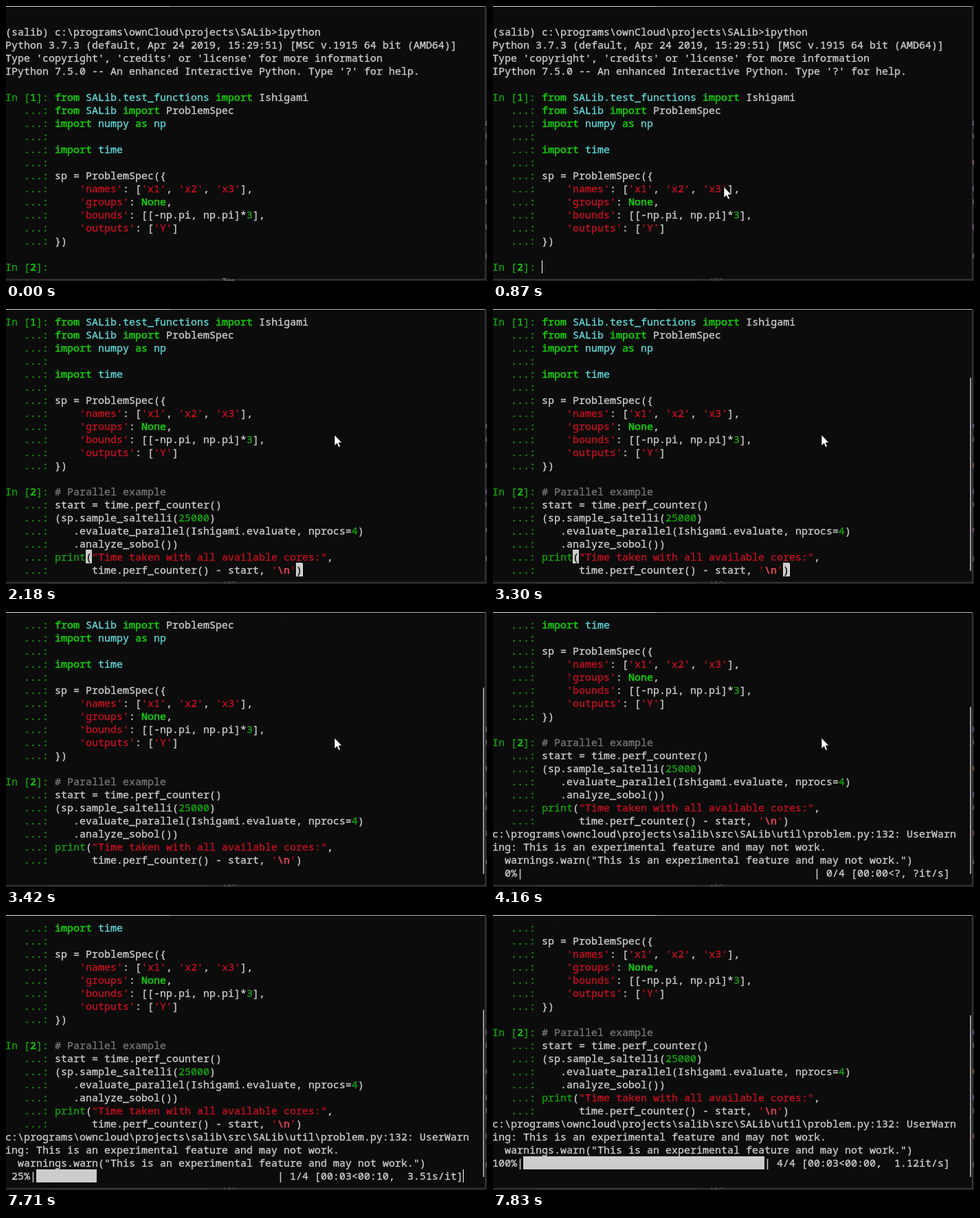
An HTML page that plays this animation: 700x400 px, repeating every 8000 ms.

```html
<!DOCTYPE html>
<html lang="en">
<head>
<meta charset="utf-8">
<title>Parallel run in IPython</title>
<style>
html, body { margin: 0; width: 100%; height: 100%; overflow: hidden; background: #0c0c0c; }
#stage { position: relative; width: 700px; height: 400px; overflow: hidden; background: #0c0c0c; }
#stage > * { position: absolute; }

/* every animated part shares one clock and changes without easing */
#log, #cursor, #mouse, #thumb, .pasted, .match, .output, .p0, .p25, .p100, .tab {
  animation: 8s step-end infinite;
}

#screen { left: -1px; top: 9px; width: 701px; height: 380px; overflow: hidden; }
#log {
  position: absolute; left: 0; top: 19px; margin: 0;
  font: 15px/19px "Noto Sans Mono", "DejaVu Sans Mono", monospace;
  font-variant-ligatures: none; color: #ccc; white-space: pre;
  -webkit-text-stroke: .35px;
  animation-name: scroll;
}
#log i { font-style: normal; color: #13a10e; }
#log b { color: #16c60c; font-weight: 400; -webkit-text-stroke: .6px; }
#log u { color: #61d6d6; text-decoration: none; }
#log s { color: #c50f1f; text-decoration: none; }
#log em { color: #767676; font-style: normal; }
#log strong { color: #e74856; font-weight: 400; -webkit-text-stroke: .6px; }
.pasted { animation-name: paste; }
.match { animation-name: match; }
.output { animation-name: output; }
.progress { position: absolute; left: 0; top: 532px; }
.p0 { animation-name: p0; }
.p25 { animation-name: p25; }
.p100 { animation-name: p100; }
.bar { display: inline-block; width: 351px; height: 19px; vertical-align: top; }
.bar::before { content: ""; display: block; height: 100%; width: var(--done); background: #ccc; }

#cursor { left: 0; top: 370px; width: 1px; height: 19px; background: #fff; animation-name: cursor; }
#thumb { left: 694px; top: 100px; width: 2px; height: 281px; background: #9a9a9a; animation-name: thumb; }
#mouse { left: 0; top: 0; animation-name: mouse; }
.tab { font: 10px/10px "Noto Sans", sans-serif; left: 315px; top: 395px; color: #999; }
.tab.before { animation-name: before; }
.tab.after { color: #4a4a4a; animation-name: after; }

@keyframes scroll {
  0% { transform: translateY(0); }
  13.25% { transform: translateY(-114px); }
  42% { transform: translateY(-133px); }
  52% { transform: translateY(-190px); }
  97.875%, 100% { transform: translateY(-209px); }
}
@keyframes thumb {
  0% { visibility: hidden; top: 100px; height: 281px; }
  41.25% { visibility: visible; top: 100px; height: 281px; }
  42% { visibility: visible; top: 110px; height: 271px; }
  52% { visibility: visible; top: 138px; height: 243px; }
  97.875%, 100% { visibility: visible; top: 146px; height: 235px; }
}
@keyframes paste { 0% { visibility: hidden; } 13.25%, 100% { visibility: visible; } }
@keyframes output { 0% { visibility: hidden; } 52%, 100% { visibility: visible; } }
@keyframes match {
  0% { background: #ccc; color: #0c0c0c; }
  42%, 100% { background: none; color: #ccc; }
}
@keyframes p0 { 0%, 95.5%, 100% { visibility: hidden; } 52% { visibility: visible; } }
@keyframes p25 { 0%, 97.125%, 100% { visibility: hidden; } 95.5% { visibility: visible; } }
@keyframes p100 { 0% { visibility: hidden; } 97.125%, 100% { visibility: visible; } }
@keyframes before { 0% { visibility: visible; } 7%, 100% { visibility: hidden; } }
@keyframes after { 0% { visibility: hidden; } 7%, 100% { visibility: visible; } }
@keyframes cursor {
  0% { left: 71px; opacity: 0; }
  7% { left: 71px; opacity: 1; }
  13.25%, 27.25%, 41.25% { left: 431px; opacity: 1; }
  20.25%, 34.25% { left: 431px; opacity: 0; }
  42%, 62.75%, 76.125%, 90.125% { left: 665px; opacity: 0; }
  56%, 69.25%, 83.125%, 94.625% { left: 665px; opacity: 1; }
  97.125%, 100% { left: 665px; opacity: 0; }
}
@keyframes mouse {
  0% { transform: translate(600px, 402px); }
  .625% { transform: translate(596px, 394px); }
  1.375% { transform: translate(579px, 384px); }
  2.125% { transform: translate(560px, 375px); }
  3% { transform: translate(543px, 368px); }
  3.75% { transform: translate(530px, 364px); }
  4.5% { transform: translate(523px, 362px); }
  7% { transform: translate(510px, 356px); }
  7.75% { transform: translate(486px, 344px); }
  8.625% { transform: translate(452px, 326px); }
  9.375% { transform: translate(412px, 304px); }
  10.125% { transform: translate(372px, 282px); }
  10.875% { transform: translate(336px, 263px); }
  11.75% { transform: translate(308px, 248px); }
  12.5% { transform: translate(291px, 239px); }
  13.25% { transform: translate(283px, 235px); }
  14% { transform: translate(284px, 235px); }
  14.75% { transform: translate(350px, 217px); }
  15.5% { transform: translate(420px, 200px); }
  16.25% { transform: translate(462px, 191px); }
  17.125% { transform: translate(478px, 183px); visibility: visible; }
  68.375%, 100% { transform: translate(478px, 183px); visibility: hidden; }
}
</style>
</head>
<body>
<div id="stage">
<div id="screen"><pre id="log">(salib) c:\programs\ownCloud\projects\SALib>ipython
Python 3.7.3 (default, Apr 24 2019, 15:29:51) [MSC v.1915 64 bit (AMD64)]
Type 'copyright', 'credits' or 'license' for more information
IPython 7.5.0 -- An enhanced Interactive Python. Type '?' for help.

<i>In [<b>1</b>]: </i><b>from</b> <u>SALib.test_functions</u> <b>import</b> Ishigami
<i>   ...: </i><b>from</b> <u>SALib</u> <b>import</b> ProblemSpec
<i>   ...: </i><b>import</b> <u>numpy</u> <b>as</b> <u>np</u>
<i>   ...: </i>
<i>   ...: </i><b>import</b> <u>time</u>
<i>   ...: </i>
<i>   ...: </i>sp = ProblemSpec({
<i>   ...: </i>    <s>'names'</s>: [<s>'x1'</s>, <s>'x2'</s>, <s>'x3'</s>],
<i>   ...: </i>    <s>'groups'</s>: <b>None</b>,
<i>   ...: </i>    <s>'bounds'</s>: [[-np.pi, np.pi]*<i>3</i>],
<i>   ...: </i>    <s>'outputs'</s>: [<s>'Y'</s>]
<i>   ...: </i>})

<i>In [<b>2</b>]: </i><span class="pasted"><em># Parallel example</em>
<i>   ...: </i>start = time.perf_counter()
<i>   ...: </i>(sp.sample_saltelli(<i>25000</i>)
<i>   ...: </i>   .evaluate_parallel(Ishigami.evaluate, nprocs=<i>4</i>)
<i>   ...: </i>   .analyze_sobol())
<i>   ...: print</i><span class="match">(</span><s>"Time taken with all available cores:"</s>,
<i>   ...: </i>      time.perf_counter() - start, <s>'<strong>\n</strong>'</s><span class="match">)</span></span>
<span class="output">c:\programs\owncloud\projects\salib\src\SALib\util\problem.py:132: UserWarn
ing: This is an experimental feature and may not work.
  warnings.warn("This is an experimental feature and may not work.")</span>
<span class="progress p0">  0%|<span class="bar" style="width:423px;--done:0"></span>| 0/4 [00:00&lt;?, ?it/s]</span><span class="progress p25"> 25%|<span class="bar" style="--done:25%"></span>| 1/4 [00:03&lt;00:10,  3.51s/it]</span><span class="progress p100">100%|<span class="bar" style="--done:100%"></span>| 4/4 [00:03&lt;00:00,  1.12it/s]</span></pre></div>
<div id="cursor"></div>
<div id="thumb"></div>

<!-- window border and the slivers of the editor behind it -->
<svg width="700" height="400" style="left:0;top:0">
  <path d="M0 .5H238" stroke="#e0e0e0"/>
  <path d="M238 .5H700" stroke="#b4b4b4"/>
  <path d="M0 397.5H698" stroke="#3a3a3a"/>
  <path d="M0 399H700" stroke="#222" stroke-width="2"/>
  <path d="M62 399H295" stroke="#2c2c2c" stroke-width="2"/>
  <path d="M697.5 0V398" stroke="#444"/>
  <path d="M699 0V398" stroke="#1e1e1e" stroke-width="2"/>
  <g stroke-width="2" stroke-dasharray="7 500">
    <path d="M699 167V180M699 262V270" stroke="#50506a"/>
    <path d="M699 186V194M699 281V289M699 360V368" stroke="#505050"/>
    <path d="M699 224V231" stroke="#6a5236"/>
    <path d="M699 318V326" stroke="#644460"/>
  </g>
</svg>
<div class="tab before">Trie</div>
<div class="tab after">ABO</div>
<svg id="mouse" width="14" height="21" style="overflow:visible">
  <path d="M0 0V16L3.7 12.6L6.1 18.2L8.6 17.1L6.2 11.6H11Z" fill="#fff" stroke="#000" stroke-width=".7"/>
</svg>
</div>
</body>
</html>
```
